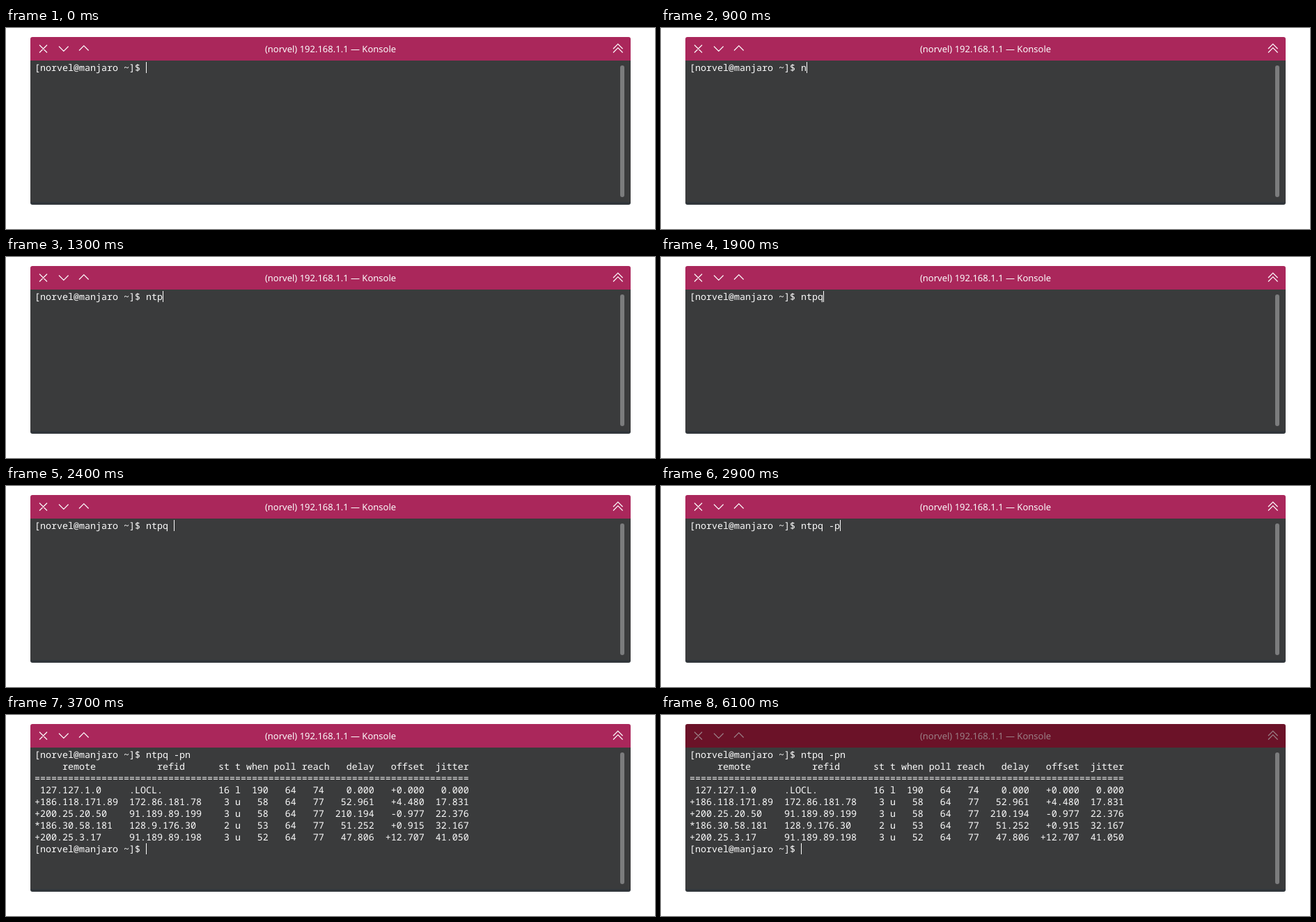
These frames come from a looping animation (932 px wide and 290 px high, 6200 ms). An HTML page:

```html
<!DOCTYPE html>
<html lang="en">
<head>
<meta charset="utf-8">
<title>Terminal</title>
<style>
  html, body { margin: 0; width: 100%; height: 100%; overflow: hidden; background: #fff; }
  svg { display: block; }
  text { text-rendering: geometricPrecision; }
  #bar { fill: #aa275b; color: #fcfcfc; }
  #bar.dim { fill: #6b1228; color: #9b7f86; }
  #bar text { fill: currentColor; font: 13px "Noto Sans", sans-serif; text-anchor: middle; }
  #icons { fill: none; stroke: currentColor; stroke-width: 1.2; }
  #lines text { fill: #fcfcfc; font: 13.3333px "Noto Sans Mono", monospace; white-space: pre; }
</style>
</head>
<body>
<svg width="932" height="290" viewBox="0 0 932 290">
  <rect x="35" y="40" width="862" height="215" rx="3" fill="#31363b"/>
  <rect x="35" y="46" width="862" height="205" fill="#3a3b3c"/>
  <rect x="882" y="54" width="6" height="190" rx="3" fill="#7b7c7d"/>
  <g id="bar">
    <path d="M35 47V16a3 3 0 0 1 3-3H894a3 3 0 0 1 3 3V47Z"/>
    <path id="icons" d="M48 24.5l11 11m0-11l-11 11M76 26.5l6.8 6.8 6.8-6.8M105 32.5l6.8-6.8 6.8 6.8M872 30l6.8-6.8 6.8 6.8M872 35.5l6.8-6.8 6.8 6.8"/>
    <text x="466" y="35">(norvel) 192.168.1.1 — Konsole</text>
  </g>
  <g id="lines"></g>
  <rect id="cursor" width="1" height="16" fill="#fcfcfc"/>
</svg>
<script>
const LOOP = 6200, ENTER = 3600, OUTPUT = 3700, DIM = 6100;
const LEFT = 41, CHAR = 8, LINE = 17;
const prompt = "[norvel@manjaro ~]$ ";
const command = "ntpq -pn";
const keyTimes = [900, 1100, 1300, 1900, 2400, 2600, 2900, 3200];
const output = [
  "     remote           refid      st t when poll reach   delay   offset  jitter",
  "=".repeat(78),
  ...[
    " 127.127.1.0|.LOCL.|16|l|190|64|74|0.000|+0.000|0.000",
    "+186.118.171.89|172.86.181.78|3|u|58|64|77|52.961|+4.480|17.831",
    "+200.25.20.50|91.189.89.199|3|u|58|64|77|210.194|-0.977|22.376",
    "*186.30.58.181|128.9.176.30|2|u|53|64|77|51.252|+0.915|32.167",
    "+200.25.3.17|91.189.89.198|3|u|52|64|77|47.806|+12.707|41.050"
  ].map(formatRow),
  prompt
];

// Positive widths align left, negative widths align right.
function formatRow(row) {
  const widths = [17, 16, -2, -2, -5, -5, -5, -9, -9, -8];
  return row.split("|")
    .map((s, i) => widths[i] > 0 ? s.padEnd(widths[i]) : s.padStart(-widths[i]))
    .join("");
}

const $ = id => document.getElementById(id);
const rows = Array.from({ length: output.length + 1 }, (_, i) => {
  const text = document.createElementNS("http://www.w3.org/2000/svg", "text");
  text.setAttribute("x", LEFT);
  text.setAttribute("y", 62 + i * LINE);
  return $("lines").appendChild(text);
});

function draw(t) {
  const typed = keyTimes.filter(k => t >= k).length;
  const screen = [prompt + command.slice(0, typed)];
  if (t >= OUTPUT) screen.push(...output);
  else if (t >= ENTER) screen.push("");

  rows.forEach((row, i) => row.textContent = screen[i] || "");
  const last = screen.length - 1;
  $("cursor").setAttribute("x", LEFT + screen[last].length * CHAR);
  $("cursor").setAttribute("y", 49 + last * LINE);
  $("bar").classList.toggle("dim", t >= DIM);
}

const start = performance.now();
function tick() {
  draw((performance.now() - start) % LOOP);
  requestAnimationFrame(tick);
}
tick();
</script>
</body>
</html>
```
